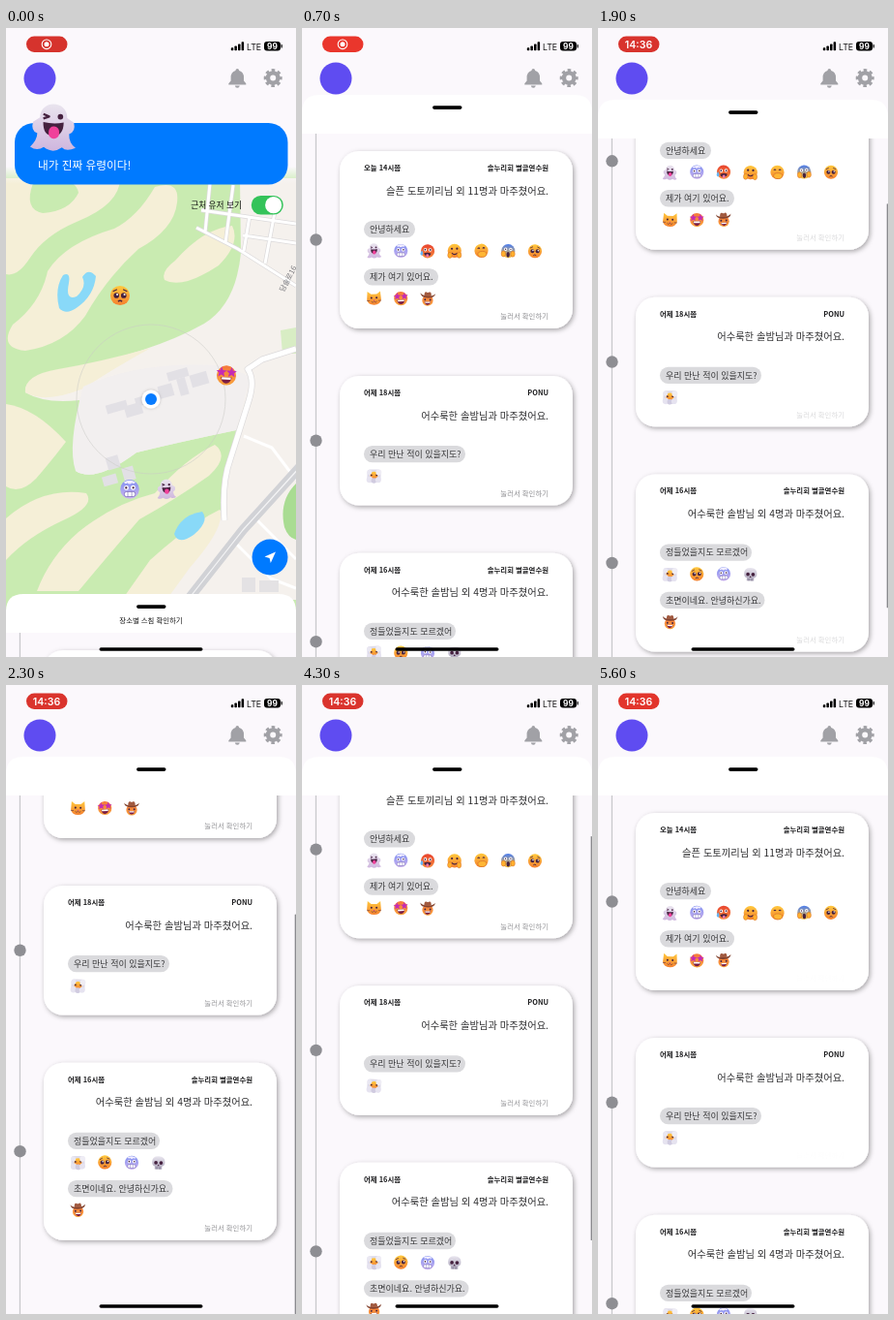
Write an HTML page that moves like this. It is 300 px wide and 649 px high and loops after 5700 ms.

```html
<!DOCTYPE html>
<html lang="ko">
<head>
<meta charset="utf-8">
<style>
html, body { margin: 0; width: 100%; height: 100%; overflow: hidden; background: #fbf8fc; }
svg { display: block; width: 100vw; height: 100vh; }
text { font-family: "Noto Sans CJK KR", "Noto Sans CJK", sans-serif; fill: #111; }
.latin { font-family: Inter, "Liberation Sans", sans-serif; }
.label { font-size: 7.4px; font-weight: 700; fill: #1c1c1e; }
.message { font-size: 10.3px; fill: #2c2c2e; }
.chip { font-size: 9px; fill: #3a3a3c; }
.hint { font-size: 7.4px; fill: #858589; }
.end { text-anchor: end; }
.mid { text-anchor: middle; }
</style>
</head>
<body>
<svg id="stage" viewBox="0 0 300 649" preserveAspectRatio="none"></svg>
<script>
const LOOP = 5700;
const CLIP_TOP = 40, CARDS_TOP = 58, PAGE = '#fbf8fc';

const circle = (x, y, r, fill, extra = '') => `<circle cx="${x}" cy="${y}" r="${r}" fill="${fill}" ${extra}/>`;
const oval = (x, y, rx, ry, fill, extra = '') => `<ellipse cx="${x}" cy="${y}" rx="${rx}" ry="${ry}" fill="${fill}" ${extra}/>`;
const rect = (x, y, w, h, r, fill, extra = '') =>
  `<rect x="${x}" y="${y}" width="${w}" height="${h}" rx="${r}" fill="${fill}" ${extra}/>`;
const path = (d, fill, extra = '') => `<path d="${d}" fill="${fill}" ${extra}/>`;
const line = (d, color, width, extra = '') =>
  `<path d="${d}" fill="none" stroke="${color}" stroke-width="${width}" stroke-linejoin="round" ${extra}/>`;
const road = (d, width) => line(d, '#dcdadb', width + 1.4) + line(d, '#fff', width);
const text = (x, y, cls, str, extra = '') => `<text x="${x}" y="${y}" class="${cls}" ${extra}>${str}</text>`;

// Emoji, each drawn around 0,0 with a radius of about 10
const gradient = (id, top, bottom) =>
  `<linearGradient id="${id}" x2="0" y2="1"><stop stop-color="${top}"/><stop offset="1" stop-color="${bottom}"/></linearGradient>`;
const gradients = gradient('yellow', '#ffc83d', '#f5812f') + gradient('red', '#e8432f', '#f78a3c') +
  gradient('blue', '#7f8ff0', '#cdb4f0') + gradient('pale', '#e9e4ee', '#cfb6de') +
  gradient('dread', '#4a7cf0', '#fdc13a') + gradient('bone', '#e9e6ef', '#a9a2b8') +
  gradient('warm', '#f5793b', '#f9a23c') + gradient('fade', PAGE, PAGE + '00');

const dark = '#45213f';
const eyes = (y = -1.5, r = 1.5) => circle(-3.6, y, r, dark) + circle(3.6, y, r, dark);
const smile = line('M-4 3Q0 7 4 3', dark, 1.6);
const face = fill => circle(0, 0, 9.6, `url(#${fill})`);
const hands = y => [-6.5, 6.5].map(x => oval(x, y, 3, 4, '#ffb12e', 'stroke="#d86b2a" stroke-width=".7"')).join('');
const star = x => path([...Array(10).keys()].map(i => {
  const a = i * Math.PI / 5, r = i % 2 ? 2.4 : 5.4;
  return (i ? 'L' : 'M') + (x + r * Math.sin(a)).toFixed(1) + ' ' + (-3 - r * Math.cos(a)).toFixed(1);
}).join('') + 'Z', '#c42bb4');

const emoji = {
  ghost: path('M-6 -4C-6 -12 6 -12 6 -4L9 -2Q10 2 7 3Q7 7 10 9Q6 11 4 9Q0 12 -4 9Q-7 11 -10 9Q-7 6 -7 3Q-10 2 -9 -2Z', 'url(#pale)') +
    line('M-4.5 -5.5L-2 -4.5L-4.5 -3.5', dark, 1) + circle(3, -4.5, 1.2, dark) +
    path('M-4.5 -2Q0 -1 4.5 -2Q4.5 4 0 4Q-4.5 4 -4.5 -2Z', dark) + rect(-2, -.2, 4.6, 5.4, 2.2, '#f0409a'),
  cold: face('blue') + circle(-3.4, -1.5, 2.4, '#fff') + circle(3.4, -1.5, 2.4, '#fff') + eyes(-1.5, 1.1) +
    path('M-6 -7Q0 -11 6 -7Q4 -4.5 2.5 -6.5Q0 -4 -2.5 -6.5Q-4 -4.5 -6 -7Z', '#f3efff') +
    rect(-5.5, 2.5, 11, 5, 2, '#fff', 'stroke="#7464b5" stroke-width=".7"') + line('M-2 2.5V7.5M2 2.5V7.5', '#7464b5', .6),
  hot: face('red') + circle(-3.4, -2, 2.4, '#fff') + circle(3.4, -2, 2.4, '#fff') + eyes(-2, 1.2) +
    path('M-5 3Q0 1 5 3Q4 7 0 7Q-4 7 -5 3Z', dark) + rect(-2, 4, 4, 4.5, 2, '#ef77a5') +
    path('M-8 -1Q-12 5 -8 6.5Q-4.500 5 -8 -1Z', '#63b5f5'),
  hug: face('yellow') + eyes(-3) + smile + hands(6),
  shy: face('yellow') + line('M-5 -3Q-3.5 -5 -2 -3M2 -3Q3.5 -5 5 -3', dark, 1.4) + oval(1, 5, 6, 4, '#ffb635', 'stroke="#cf6929" stroke-width=".8"'),
  scream: face('dread') + circle(-3.5, -2.5, 2.3, '#fff') + circle(3.5, -2.5, 2.3, '#fff') + eyes(-2.5, .9) +
    oval(0, 5, 2.3, 3.8, dark) + hands(4),
  plead: face('yellow') + eyes(0, 2.7) + circle(-2.8, -1, 1, '#fff') + circle(4.4, -1, 1, '#fff') +
    line('M-7 -4L-3 -6M7 -4L3 -6', dark, 1) + line('M-2 6Q0 4 2 6', dark, 1.2),
  cat: path('M-9 -10L-4 -6H4L9 -10L10 2Q8 9 0 9Q-8 9 -10 2Z', 'url(#yellow)') + eyes(-1, 1.4) + path('M-1.5 2H1.5L0 4Z', '#e0508f') +
    line('M-4 4Q-2 7 0 4Q2 7 4 4M-10 3L-6 3M10 3L6 3', dark, .7),
  stars: face('warm') + path('M-5.500 2H5.500Q4 8 0 8Q-4 8 -5.500 2Z', '#7b1d43') + rect(-4.5, 2, 9, 2.2, .5, '#fff') + star(-5) + star(5),
  cowboy: circle(0, 2.2, 7.6, 'url(#warm)') + path('M-10.5 -8Q-8 -4 0 -4Q8 -4 10.5 -8Q10 -1.500 0 -1.500Q-10 -1.500 -10.5 -8Z', '#82432f') +
    path('M-5 -4Q-5 -10.500 -2 -9.5Q0 -8 2 -9.5Q5 -10.500 5 -4Z', '#a15a40') + eyes(1.2, 1.3) +
    path('M-4.5 4H4.5Q3 8.500 0 8.500Q-3 8.500 -4.5 4Z', '#7b1d43') + rect(-3.6, 4, 7.2, 1.7, .5, '#fff'),
  cloud: rect(-9.5, -9, 19, 18, 4, '#dedbea') + circle(0, -.5, 5.4, 'url(#yellow)') + eyes(-1, 1.2) +
    circle(-6, 5.5, 4.4, '#e6e3f0') + circle(0, 6.5, 3.8, '#d0cbe0') + circle(6.5, -5, 4, '#efedf5') +
    circle(-6.500, -5, 3.4, '#e9e7f2') + circle(6, 5.5, 4, '#e6e3f0'),
  skull: path('M-9 -1Q-9 -9 0 -9Q9 -9 9 -1Q9 4 5 5V9H-5V5Q-9 4 -9 -1Z', 'url(#bone)') + eyes(0, 2.5) + path('M0 2L1.5 4.5H-1.5Z', dark) +
    line('M-2 6V9M2 6V9', '#6b6478', .9)
};
const place = (name, x, y, scale) =>
  `<g transform="translate(${x} ${y}) scale(${scale})"><g class="wiggle">${emoji[name]}</g></g>`;

// Map screen
const cream = '#f5efd7', green = '#c9ebb1', plain = '#f5f1ed';
const buildings = [[106, 377, 22, 9], [124, 383, 18, 12], [137, 378, 26, 9], [163, 373, 15, 13], [176, 362, 22, 9],
  [184, 371, 9, 18], [198, 371, 18, 13], [91, 429, 13, 13], [104, 444, 12, 14], [82, 447, 15, 10]];
const map = `
  ${rect(0, 0, 300, 600, 0, green)}
  ${path('M0 155H118Q118 182 73 200Q40 214 25 237Q12 257 0 254Z', cream)}
  ${path('M28 160Q72 150 75 170Q66 189 38 191Q18 187 28 160Z', green)}
  ${path('M154 164Q180 156 177 180Q174 208 137 228Q104 258 82 297Q60 327 20 333Q-8 330 7 306Q36 284 43 251Q61 222 112 207Q136 195 154 164Z', cream)}
  ${path('M242 155H300V590H166L222 497L238 415Q180 427 135 438Q92 470 72 457L76 384Q40 388 20 376Q18 360 54 354Q150 336 205 305Q238 285 243 232Z', plain)}
  ${path('M175 240Q204 207 234 204Q243 222 220 245Q182 270 164 260Q160 251 175 240Z', cream)}
  ${path('M20 376Q18 358 54 352Q100 344 150 330Q110 352 80 372Q40 388 20 376Z', cream)}
  ${path('M80 370Q141 342 228 349L253 360L238 415Q180 427 135 438Q92 470 72 457Q63 431 80 370Z', '#f2efef')}
  ${path('M0 388Q30 392 62 427Q45 449 31 465Q14 482 0 473Z', cream)}
  ${path('M216 430Q232 442 210 462Q176 486 138 507Q105 545 75 581H32Q45 546 75 520Q111 491 154 480Q186 444 216 430Z', cream)}
  ${path('M0 506Q38 473 83 480Q93 493 59 508Q22 525 0 549Z', cream)}
  ${path('M149 549Q190 512 221 497Q228 514 190 557L166 590H120Z', cream)}
  ${path('M59 255Q50 269 55 289Q62 297 74 288Q91 276 93 256Q85 247 79 257Q84 267 73 277Q61 282 65 263Q67 251 59 255Z', '#89d9f8')}
  ${path('M174 522Q181 502 203 499Q211 509 194 523Q178 534 174 522Z', '#89d9f8')}
  ${path('M300 470Q282 488 288 515Q292 526 300 528Z', '#a9dc92')}
  ${path('M284 312L300 309V336H286Z', '#d8edc4')}
  <g transform="rotate(-16 150 395)">${buildings.map(b => rect(...b, 0, '#e2e0e5')).join('')}</g>
  ${road('M197 206L240 228L300 266M211 160L206 211M235 162L227 222M252 194L246 230M202 188L300 202M278 190L268 243M300 222L245 214', 3)}
  ${road('M300 331L265 342L250 352Q258 363 251 385L232 445Q223 469 226 508', 5.2)}
  ${line('M246 421L275 433L300 466M233 527L274 568L300 578M260 508L300 548', '#fff', 3)}
  ${line('M185 594L245 518L305 452', '#d1d2d6', 10)}${line('M185 594L245 518L305 452', '#f5f5f6', 1.2)}
  ${rect(244, 567, 14, 15, 0, '#e4e2e4')}${rect(262, 570, 20, 12, 0, '#e4e2e4')}
  ${text(0, 0, 'mid', '담솔로16', 'transform="translate(294 260) rotate(-62)" font-size="7.5" style="fill:#77777c"')}
  ${circle(150, 383, 77, 'none', 'stroke="#c9c9c5" stroke-width=".7" opacity=".75"')}
  ${rect(0, 0, 300, 143, 0, PAGE)}${rect(0, 143, 300, 18, 0, 'url(#fade)')}
  ${circle(150, 383, 9.5, '#fff', 'filter="url(#soft)"')}${circle(150, 383, 6, '#087bff')}
  ${place('plead', 118, 276, 1.05)}${place('stars', 228, 358, 1.05)}${place('cold', 128, 476, 1.02)}${place('ghost', 166, 476, .98)}
  ${rect(9, 98, 282.5, 63.5, 20, '#007aff')}
  ${place('ghost', 49, 101.5, 2.35)}
  ${text(33, 146, '', '내가 진짜 유령이다!', 'font-size="11.7" font-weight="500" style="fill:#fff"')}
  ${text(244, 186, 'end', '근처 유저 보기', 'font-size="8.7" font-weight="500"')}
  ${rect(253.8, 173, 33, 19.5, 9.75, '#34c35a')}${circle(276.7, 182.7, 8.6, '#fff')}
  ${circle(273, 546, 18.5, '#007aff')}${path('M279 540.5L273.8 552L272.6 547L267.5 545.6Z', '#fff')}`;

// Sheet with the list of encounters
const cards = [
  { y: 0, h: 183, when: '오늘 14시쯤', where: '솔누리회 별골연수원', message: '슬픈 도토끼리님 외 11명과 마주쳤어요.',
    rows: [['안녕하세요', 53, 'ghost cold hot hug shy scream plead'], ['제가 여기 있어요.', 77, 'cat stars cowboy']] },
  { y: 232, h: 133.5, when: '어제 18시쯤', where: 'PONU', message: '어수룩한 솔밤님과 마주쳤어요.',
    rows: [['우리 만난 적이 있을지도?', 105, 'cloud']] },
  { y: 414.7, h: 183, when: '어제 16시쯤', where: '솔누리회 별골연수원', message: '어수룩한 솔밤님 외 4명과 마주쳤어요.',
    rows: [['정들었을지도 모르겠어', 95, 'cloud plead cold skull'], ['초면이네요. 안녕하신가요.', 108.5, 'cowboy']] }
];
const chipRow = ([label, width, names], i) => {
  const y = 72 + i * 49.3;
  return rect(64, y, width, 17.3, 8.6, '#dadadd') + text(70, y + 12, 'chip', label) +
    names.split(' ').map((name, k) => place(name, 74.5 + 27.75 * k, y + 31, .74)).join('');
};
const card = c => `<g transform="translate(0 ${c.y})">
  ${rect(39, 0, 241, c.h, 20, '#fff', 'filter="url(#shadow)"')}${circle(14.5, c.h / 2, 6.2, '#8e8e93')}
  ${text(64, 20, 'label', c.when)}${text(255, 20, 'label end', c.where)}
  ${text(255, 44.6, 'message end', c.message)}
  ${c.rows.map(chipRow).join('')}
  ${text(255, c.h - 9.6, 'hint end', '눌러서 확인하기')}</g>`;
const sheet = `<g id="sheet">
  ${path('M0 700V18Q0 0 18 0H282Q300 0 300 18V700Z', '#fff')}
  ${rect(0, CLIP_TOP, 300, 660, 0, PAGE)}
  ${rect(13.8, CLIP_TOP, 1.3, 660, 0, '#c9c9cc')}
  <g clip-path="url(#list)"><g id="cards">${cards.map(card).join('')}</g></g>
  ${rect(135, 11.3, 30.5, 3.6, 1.8, '#000')}
  ${text(150, 30.3, 'mid', '장소별 스침 확인하기', 'id="caption" font-size="7.4" font-weight="500"')}
</g>`;

const chrome = `
  ${rect(21, 8.5, 42.5, 16.5, 8.2, '#e33', 'id="pill"')}
  <g id="record">${circle(42, 16.8, 4.8, 'none', 'stroke="#fff" stroke-width="1.1"')}${circle(42, 16.8, 2.5, '#fff')}</g>
  ${text(42, 20.6, 'latin mid', '14:36', 'id="clock" font-size="10.6" font-weight="600" style="fill:#fff"')}
  ${[3, 4.8, 6.8, 9].map((h, i) => rect(232.8 + 3.6 * i, 23.3 - h, 2.5, h, .7, '#000')).join('')}
  ${text(249, 22.8, 'latin', 'LTE', 'font-size="8.8"')}
  ${rect(267, 14, 17, 9.6, 3, '#000')}${rect(284.6, 17, 1.2, 3.5, .6, '#000')}
  ${text(275.4, 21.9, 'latin mid', '99', 'font-size="8.4" font-weight="700" style="fill:#fff"')}
  ${circle(35, 52, 16.5, '#5f4cf1')}
  ${path('M239.3 42Q241 42 241.2 44Q246 45.5 246 51V54.5L248.3 57.3V58.5H230.3V57.3L232.6 54.5V51Q232.6 45.5 237.4 44Q237.6 42 239.3 42ZM236.8 59.5H241.8Q241.4 61.7 239.3 61.7Q237.2 61.7 236.8 59.5Z', '#a1a1a6')}
  ${circle(276.2, 51.6, 5.2, 'none', 'stroke="#a1a1a6" stroke-width="4.4"')}
  ${circle(276.2, 51.6, 8, 'none', 'stroke="#a1a1a6" stroke-width="3" stroke-dasharray="3.5 2.783" stroke-dashoffset="1.75"')}`;

const stage = document.getElementById('stage');
stage.innerHTML = `<defs>${gradients}
  <clipPath id="list">${rect(0, CLIP_TOP, 300, 660, 0, '#000')}</clipPath>
  <filter id="shadow" x="-10%" y="-10%" width="120%" height="125%"><feDropShadow dx="1.5" dy="1.8" stdDeviation="2.5" flood-opacity=".34"/></filter>
  <filter id="soft" x="-50%" y="-50%" width="200%" height="200%"><feDropShadow dx="0" dy="0" stdDeviation="1.5" flood-opacity=".25"/></filter>
  </defs>${rect(0, 0, 300, 649, 0, PAGE)}${map}${sheet}${rect(298.7, 114, 1.3, 417, .6, '#8a8a8e', 'id="thumb"')}${chrome}
  ${rect(96.5, 639.2, 107, 3.6, 1.8, '#000')}`;

const el = id => document.getElementById(id);
const parts = Object.fromEntries(['sheet', 'cards', 'caption', 'pill', 'record', 'clock', 'thumb'].map(id => [id, el(id)]));
const hints = [...document.querySelectorAll('.hint')];
const wiggles = [...document.querySelectorAll('.wiggle')];

const clamp = (v, lo = 0, hi = 1) => Math.min(hi, Math.max(lo, v));
const wave = (t, period, low) => .5 - .5 * Math.cos(2 * Math.PI * (t - low) / period);

// Smooth curve through [time, value] points, flat at every turning point
function curve(points) {
  const slope = i => (points[i + 1][1] - points[i][1]) / (points[i + 1][0] - points[i][0]);
  const tangent = points.map((_, i) => {
    if (!i || i === points.length - 1) return 0;
    const a = slope(i - 1), b = slope(i);
    return a * b <= 0 ? 0 : 2 * a * b / (a + b);
  });
  return t => {
    if (t <= points[0][0]) return points[0][1];
    const i = points.findIndex(p => p[0] > t) - 1;
    if (i < 0) return points[points.length - 1][1];
    const [t0, v0] = points[i], [t1, v1] = points[i + 1], d = t1 - t0, u = (t - t0) / d;
    const s = u * u * (3 - 2 * u);
    return v0 + (v1 - v0) * s + d * u * (1 - u) * (tangent[i] * (1 - u) - tangent[i + 1] * u);
  };
}
const sheetTop = curve([[50, 584], [200, 445], [300, 275], [400, 150], [500, 92], [600, 73], [700, 69], [900, 72.5], [1150, 74]]);
const scrollTop = curve([[1300, 0], [1600, 32], [1900, 86], [2100, 131], [2300, 157], [2500, 155.5], [2900, 151],
  [3650, 151], [3900, 128], [4300, 54], [4600, 14], [4900, 2], [5200, 0]]);

function draw(t) {
  const top = sheetTop(t), scroll = scrollTop(t);
  parts.sheet.setAttribute('transform', `translate(0 ${top})`);
  parts.cards.setAttribute('transform', `translate(0 ${CARDS_TOP - scroll})`);
  parts.caption.setAttribute('opacity', clamp((top - 380) / 200));

  const thumbTop = 114 + scroll * .78;
  parts.thumb.setAttribute('y', thumbTop);
  parts.thumb.setAttribute('height', Math.min(417, 649 - thumbTop));
  parts.thumb.setAttribute('opacity', Math.min(clamp((t - 1350) / 150), clamp((5400 - t) / 300)));

  const glow = wave(t, 2000, 50);
  parts.pill.setAttribute('fill', `rgb(${214 + 28 * glow},${51 + 4 * glow},${45 - 2 * glow})`);
  const timeShown = clamp((t - 1200) / 200);
  parts.clock.setAttribute('opacity', timeShown);
  parts.record.setAttribute('opacity', 1 - timeShown);

  const hintOpacity = wave(t, 2000, 1530);
  hints.forEach(h => h.setAttribute('opacity', hintOpacity));
  wiggles.forEach((w, i) => {
    const a = Math.sin(2 * Math.PI * t / 1900 + i * 1.7);
    w.setAttribute('transform', `translate(0 ${.4 * a}) rotate(${3 * a})`);
  });
}

const start = performance.now();
function tick() {
  draw((performance.now() - start) % LOOP);
  requestAnimationFrame(tick);
}
draw(0);
requestAnimationFrame(tick);
</script>
</body>
</html>
```
